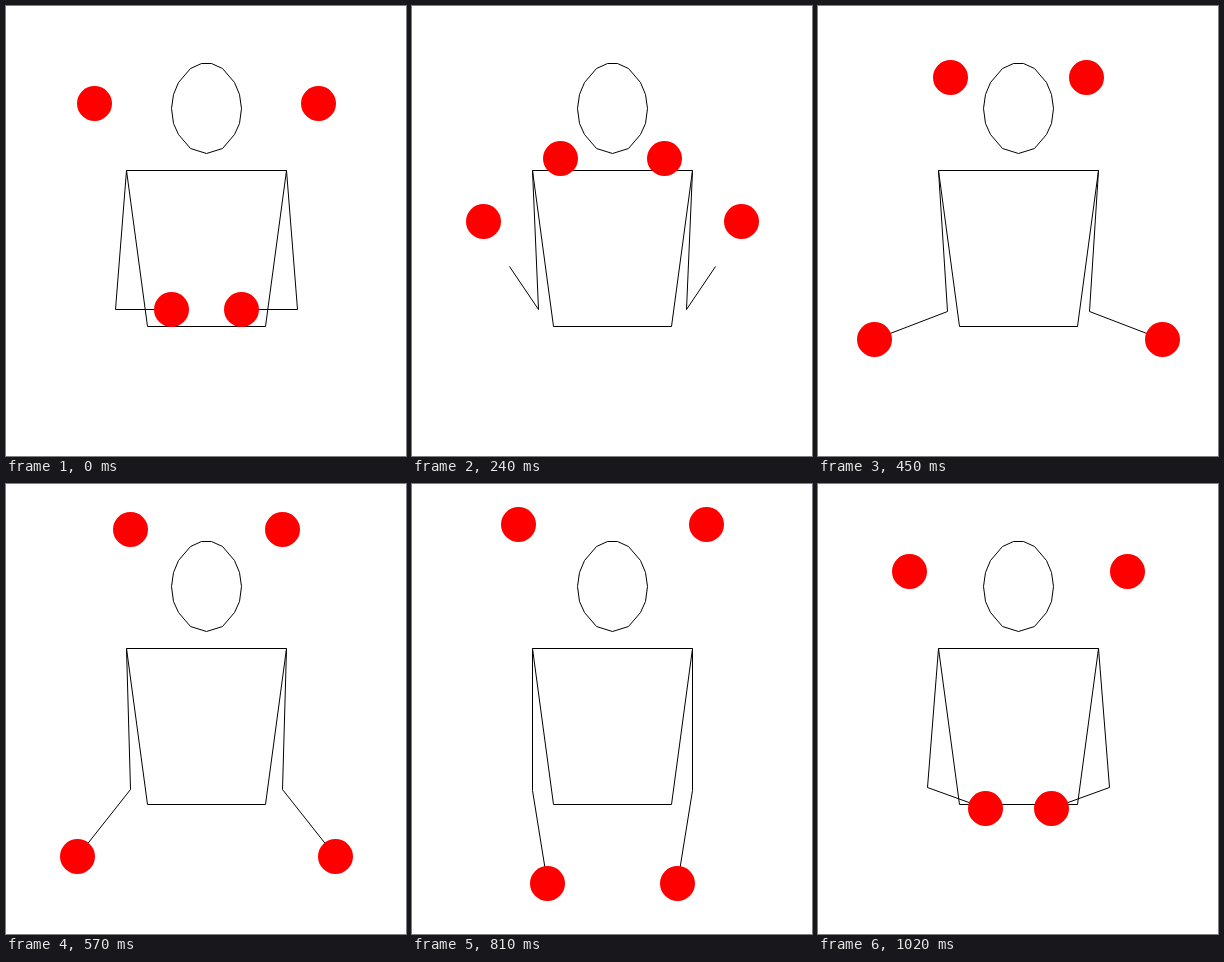
Animation of 400x450 px, one loop 1.05 s. Source, as an HTML page with a canvas:

```html
<!DOCTYPE html>
<html lang="en">
<head>
<meta charset="utf-8">
<title>Four ball fountain</title>
<style>
  html, body { margin: 0; width: 100%; height: 100%; overflow: hidden; background: #fff; }
  canvas { display: block; }
</style>
</head>
<body>
<canvas id="stage" width="400" height="450"></canvas>
<script>
const ctx = document.getElementById('stage').getContext('2d');

// Time is counted in ticks of 30 ms; each hand throws once per beat.
const TICK = 30, BEAT = 35, CATCH = 12.25;
const FLIGHT = BEAT + CATCH;
const HAND_Y = 303.03, THROW_X = 165.4, DRIFT = -2.2;
const CATCH_X = THROW_X + DRIFT * FLIGHT;
const APEX_Y = 35.42, GRAVITY = 0.4795;
const THROW_VY = -GRAVITY * FLIGHT;
const SHOULDER = [120, 164], ARM = 142.2, REACH = 104.3;

const HEAD = [[195, 57], [184, 62], [172, 76], [167, 88], [165, 102],
              [167, 117], [172, 128], [184, 142], [200, 147]];
const TORSO = [[120, 164], [280, 164], [259, 320], [141, 320]];

const mirror = ([x, y]) => [400 - x, y];
const snap = ([x, y]) => [Math.round(x), Math.floor(y)];

// Hand speed at the catch that keeps the acceleration continuous there.
function catchSpeed(from, to, v) {
  const a = CATCH, b = BEAT - CATCH;
  const out = 6 * (to - from) / a, back = 6 * (from - to) / b;
  return ((out - 2 * v) / a + (back - 2 * v) / b) / (4 / a + 4 / b);
}
const CATCH_VX = catchSpeed(THROW_X, CATCH_X, DRIFT);
const CATCH_VY = catchSpeed(HAND_Y, HAND_Y, THROW_VY);

function hermite(s, span, p, v, q, w) {
  const r = 1 - s, blend = s * s * (3 - 2 * s);
  return p + (q - p) * blend + span * (v * s * r * r - w * s * s * r);
}

function handAt(n) {
  if (n < CATCH) {
    const s = n / CATCH;
    return [hermite(s, CATCH, THROW_X, DRIFT, CATCH_X, CATCH_VX),
            hermite(s, CATCH, HAND_Y, THROW_VY, HAND_Y, CATCH_VY)];
  }
  const span = BEAT - CATCH, s = (n - CATCH) / span;
  return [hermite(s, span, CATCH_X, CATCH_VX, THROW_X, DRIFT),
          hermite(s, span, HAND_Y, CATCH_VY, HAND_Y, THROW_VY)];
}

// Age runs over two beats: flight first, then carried by the hand.
function ballAt(age) {
  if (age >= FLIGHT) return handAt(age - BEAT);
  const d = age - FLIGHT / 2;
  return [THROW_X + DRIFT * age, APEX_Y + GRAVITY * d * d];
}

// The elbow hangs below the shoulder-hand line, with the hand held in front.
function elbowAt(hand) {
  const dx = hand[0] - SHOULDER[0], dy = hand[1] - SHOULDER[1];
  const h = Math.hypot(dx, REACH), dist = Math.hypot(h, dy);
  const drop = Math.sqrt(Math.max(0, ARM * ARM - dist * dist / 4));
  const out = h / 2 - drop * dy / dist;
  const down = dy / 2 + drop * h / dist;
  return [SHOULDER[0] + out * dx / h, SHOULDER[1] + down];
}

function trace(points) {
  ctx.beginPath();
  for (const [x, y] of points) ctx.lineTo(x, y);
}

function outline(points) {
  trace(points);
  ctx.closePath();
  ctx.stroke();
}

function limb(points) {
  trace(points);
  ctx.stroke();
}

function disc([x, y]) {
  ctx.beginPath();
  ctx.arc(x, y, 17.5, 0, Math.PI * 2);
  ctx.fill();
}

function draw(n) {
  ctx.setTransform(1, 0, 0, 1, 0, 0);
  ctx.fillStyle = '#fff';
  ctx.fillRect(0, 0, 400, 450);

  // Pixel centres, so that level lines stay crisp
  ctx.translate(0.5, 0.5);
  ctx.strokeStyle = '#000';
  ctx.lineWidth = 1;
  outline(TORSO);
  outline([...HEAD, ...HEAD.map(mirror).reverse()]);

  const hand = handAt(n);
  const arm = [SHOULDER, snap(elbowAt(hand)), snap(hand)];
  limb(arm);
  limb(arm.map(mirror));

  ctx.fillStyle = '#f00';
  for (const age of [n, n + BEAT]) {
    const ball = snap(ballAt(age));
    disc(ball);
    disc(mirror(ball));
  }
}

const start = performance.now();
function loop() {
  draw(Math.floor((performance.now() - start) / TICK) % BEAT);
  requestAnimationFrame(loop);
}
loop();
</script>
</body>
</html>
```
